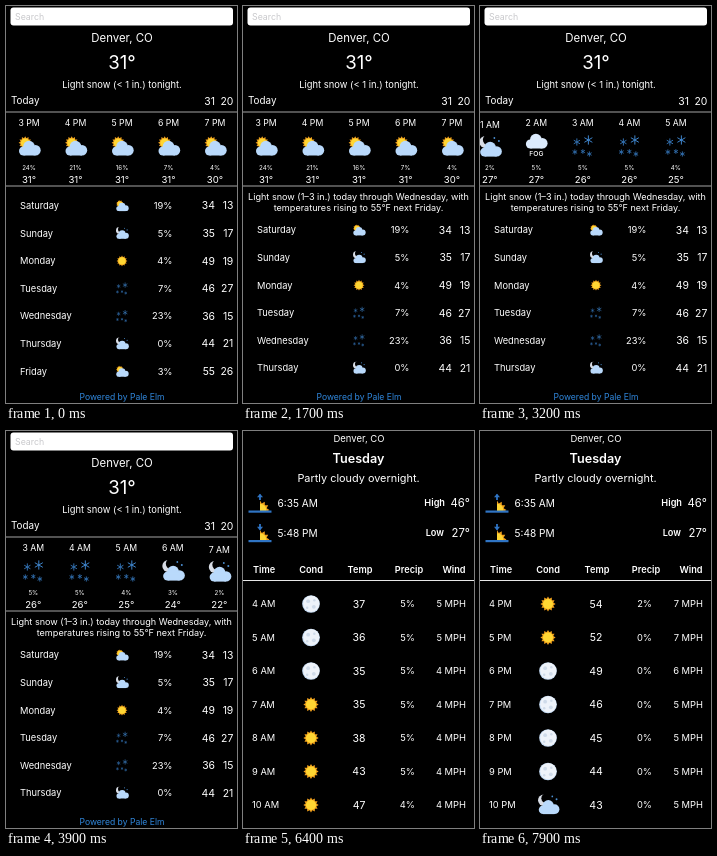
An HTML page with a canvas for the animation above (8 s loop, 231 px wide and 397 px high).

```html
<!DOCTYPE html>
<html lang="en">
<head>
<meta charset="utf-8">
<title>Weather</title>
<style>
html, body { margin: 0; width: 100%; height: 100%; overflow: hidden; background: #000; }
canvas { display: block; width: 231px; height: 397px; }
</style>
</head>
<body>
<canvas id="stage"></canvas>
<script>
const W = 231, H = 397, LOOP = 8000;
const canvas = document.getElementById('stage');
const c = canvas.getContext('2d');
const dpr = window.devicePixelRatio || 1;
canvas.width = W * dpr;
canvas.height = H * dpr;

// Smooth curve through [time, value] points, at rest at both ends.
function track(t, pts) {
  const n = pts.length - 1;
  if (t <= pts[0][0]) return pts[0][1];
  if (t >= pts[n][0]) return pts[n][1];
  const slope = i => {
    if (i === 0 || i === n) return 0;
    const a = (pts[i][1] - pts[i - 1][1]) / (pts[i][0] - pts[i - 1][0]);
    const b = (pts[i + 1][1] - pts[i][1]) / (pts[i + 1][0] - pts[i][0]);
    return a * b <= 0 ? 0 : 2 * a * b / (a + b);
  };
  const i = pts.findIndex(p => p[0] > t) - 1;
  const [t0, v0] = pts[i], [t1, v1] = pts[i + 1];
  const d = t1 - t0, u = (t - t0) / d, w = 1 - u;
  return v0 * w * w * (1 + 2 * u) + v1 * u * u * (3 - 2 * u) +
    slope(i) * d * u * w * w - slope(i + 1) * d * u * u * w;
}

// y is the middle of the capitals.
function text(s, x, y, size, align = 'left', color = '#fff', weight = 400) {
  c.font = `${weight} ${size}px Inter, Roboto, sans-serif`;
  c.textAlign = align;
  c.fillStyle = color;
  c.fillText(s, x, y + size * 0.36);
}

function disc(x, y, r, color) {
  c.fillStyle = color;
  c.beginPath();
  c.arc(x, y, r, 0, Math.PI * 2);
  c.fill();
}

function rule(y, color = '#a4a4a4') {
  c.fillStyle = color;
  c.fillRect(0, y, W, 1);
}

function clipped(y0, y1, draw) {
  c.save();
  c.beginPath();
  c.rect(0, y0, W, y1 - y0);
  c.clip();
  draw();
  c.restore();
}

function sunAt(x, y, r) {
  c.fillStyle = '#f0a01c';
  c.beginPath();
  for (let i = 0; i < 24; i++) {
    const a = i * Math.PI / 12, q = i % 2 ? r * 0.72 : r;
    c.lineTo(x + q * Math.cos(a), y + q * Math.sin(a));
  }
  c.fill();
  disc(x, y, r * 0.66, '#ffd633');
}

function cloud(x, y, color = '#b9d9fb') {
  disc(x - 6, y + 2.5, 4.5, color);
  disc(x - 0.5, y - 2, 5.8, color);
  disc(x + 6, y + 1.8, 5.2, color);
  c.fillRect(x - 6, y, 12, 7);
}

function flake(x, y, r) {
  c.strokeStyle = r > 4 ? '#3f85cc' : '#326fae';
  c.lineWidth = r > 3 ? 1 : 0.9;
  c.beginPath();
  for (let i = 0; i < 3; i++) {
    const a = i * Math.PI / 3 + Math.PI / 6;
    const dx = r * Math.cos(a), dy = r * Math.sin(a);
    c.moveTo(x - dx, y - dy);
    c.lineTo(x + dx, y + dy);
  }
  c.stroke();
}

// Half a sun on the horizon; the arrow points up (dir -1) or down (dir 1).
function sunEdge(dir) {
  clipped(-5, 6, () => sunAt(0, 5, 9.5));
  c.fillStyle = '#2f74c4';
  c.fillRect(-11.5, 5.5, 23, 2.2);
  c.fillRect(-0.9, -10.5, 1.8, 5.5);
  c.beginPath();
  c.moveTo(-3, -7.7);
  c.lineTo(3, -7.7);
  c.lineTo(0, -7.7 + dir * 3.6);
  c.fill();
}

const icons = {
  day() { sunAt(-3.8, -3.2, 6.6); cloud(0.5, 2.5); },
  night() {
    disc(-4.5, -5, 6, '#d8dde6');
    disc(-1.8, -7.2, 5.2, '#000');
    disc(4.5, -9, 0.9, '#4b8fd2');
    disc(9, -6, 1, '#4b8fd2');
    cloud(0.8, 2.6);
  },
  fog() { cloud(0, -4.5, '#dcebfd'); text('FOG', 0, 8, 6.7, 'center', '#fff', 500); },
  snow() {
    flake(5.5, -6, 4.6);
    flake(-6, -4, 3.6);
    flake(-8, 6, 2.6);
    flake(0, 5.5, 2.3);
    flake(6.5, 8, 2.6);
  },
  sun() { sunAt(0, 0, 9.5); },
  moon() {
    disc(0, 0, 9.3, '#c6dcf4');
    disc(0.3, -0.2, 8.5, '#eef3fa');
    for (const [x, y, r] of [[-3, -3, 2], [3.5, -4, 1.3], [3, 3, 2], [-4, 4, 1.3]])
      disc(x, y, r, '#cfdbea');
  },
  rise() { sunEdge(-1); },
  set() { sunEdge(1); }
};

function icon(name, x, y, scale = 1) {
  c.save();
  c.translate(x, y);
  c.scale(scale, scale);
  icons[name]();
  c.restore();
}

const hourName = h => `${h % 12 || 12} ${h % 24 < 12 ? 'AM' : 'PM'}`;

// icon, chance of rain, temperature; from 3 PM on
const hours = [
  ['day', 24, 31], ['day', 21, 31], ['day', 16, 31], ['day', 7, 31], ['day', 4, 30],
  ['night', 3, 29], ['night', 3, 28], ['night', 2, 27], ['night', 2, 27], ['night', 2, 27],
  ['night', 2, 27], ['fog', 5, 27], ['snow', 5, 26], ['snow', 5, 26], ['snow', 4, 25],
  ['night', 3, 24], ['night', 2, 22]
];
const days = [
  ['Saturday', 'day', 19, 34, 13], ['Sunday', 'night', 5, 35, 17], ['Monday', 'sun', 4, 49, 19],
  ['Tuesday', 'snow', 7, 46, 27], ['Wednesday', 'snow', 23, 36, 15],
  ['Thursday', 'night', 0, 44, 21], ['Friday', 'day', 3, 55, 26]
];
const temps = [39, 39, 38, 37, 37, 36, 35, 35, 38, 43, 47, 50, 52, 54, 55, 55, 54, 52, 49, 46, 45, 44, 43, 42];
const rain = h => h < 10 ? 5 : h < 12 ? 4 : h < 14 ? 3 : h < 17 ? 2 : 0;
const wind = h => h < 6 ? 5 : h < 11 ? 4 : h < 13 ? 5 : h < 15 ? 6 : h < 18 ? 7 : h < 19 ? 6 : 5;
const sky = h => h < 7 ? 'moon' : h < 18 ? 'sun' : h < 22 ? 'moon' : 'night';

function drawHours(shift) {
  hours.forEach(([name, chance, temp], i) => {
    const x = 23 + i * 46.5 - shift;
    if (x < -30 || x > W + 30) return;
    const low = (i > 4 && i < 11) || i === 16 ? 2 : 0;
    text(hourName(15 + i), x, 117 + low, 8.7, 'center');
    icon(name, x, 140 + low / 2);
    text(chance + '%', x, 161.3, 6.2, 'center');
    text(temp + '°', x, 173.6, 9.6, 'center');
  });
}

function drawDays(top) {
  text('Light snow (1–3 in.) today through Wednesday, with', W / 2, top - 33.5, 9.1, 'center');
  text('temperatures rising to 55°F next Friday.', W / 2, top - 22, 9.1, 'center');
  days.forEach(([day, name, chance, high, low], i) => {
    const y = top + i * 27.6;
    text(day, 14, y, 9.3);
    icon(name, 116, y, 0.57);
    text(chance + '%', 166.5, y, 9.3, 'right');
    text(high, 209, y, 10.4, 'right');
    text(low, 227.3, y, 10.4, 'right');
  });
}

function drawForecast(t) {
  c.fillStyle = '#fff';
  c.beginPath();
  c.roundRect(4.5, 1.5, 222.5, 18, 3);
  c.fill();
  text('Search', 9, 11, 8.8, 'left', '#c9c9cc');
  text('Denver, CO', 116, 32.3, 11.4, 'center');
  text('31°', 116, 56, 18.6, 'center');
  text('Light snow (< 1 in.) tonight.', 116, 79, 9.4, 'center');
  text('Today', 5, 94.8, 9.9);
  text('31', 209, 94.8, 10.4, 'right');
  text('20', 227.3, 94.8, 10.4, 'right');

  const shift = track(t, [[1700, 0], [2400, 243], [3200, 478], [4300, 569]]);
  const top = track(t, [[50, 199.7], [350, 192], [800, 199.7], [930, 199.7], [1100, 210], [1500, 224]]);
  clipped(107, 179, () => drawHours(shift));
  clipped(183, 379, () => drawDays(top));
  rule(105.5);
  rule(179.5);
  text('Powered by Pale Elm', 116, 391, 8.6, 'center', '#3087dc');
}

function drawDetail(t) {
  text('Denver, CO', 116, 7.3, 9.5, 'center');
  text('Tuesday', 115.5, 27, 12.6, 'center', '#fff', 600);
  text('Partly cloudy overnight.', 115.5, 47.3, 10.9, 'center');
  icon('rise', 17, 74);
  icon('set', 17, 103.5);
  text('6:35 AM', 34.5, 72, 10.1);
  text('5:48 PM', 34.5, 102, 10.1);
  text('High', 202, 72, 9.2, 'right', '#fff', 600);
  text('46°', 227, 72, 11.3, 'right');
  text('Low', 201, 102, 9.2, 'right', '#fff', 600);
  text('27°', 227, 102, 11.3, 'right');
  [['Time', 21], ['Cond', 68], ['Temp', 117], ['Precip', 166], ['Wind', 211]]
    .forEach(([s, x]) => text(s, x, 139, 9.2, 'center', '#fff', 600));
  rule(149, '#e8e8e8');

  // The table scrolls by whole rows.
  const pos = t < 6400 ? (t - 6000) / 100 : 4 + (t - 6400) / 125;
  const first = Math.round(Math.min(16, Math.max(0, pos)));
  for (let i = 0; i < 7; i++) {
    const h = first + i, y = 173 + i * 33.5;
    text(hourName(h), 9, y, 9.3);
    const name = sky(h);
    icon(name, 68, y, name === 'sun' ? 0.8 : 0.95);
    text(temps[h], 116, y, 10.5, 'center');
    text(rain(h) + '%', 172, y, 9.3, 'right');
    text(wind(h) + ' MPH', 223, y, 9.4, 'right');
  }
}

function page(x, draw, t) {
  c.save();
  c.translate(x, 0);
  c.fillStyle = '#000';
  c.fillRect(0, 0, W, H);
  draw(t);
  c.restore();
}

function frame(now) {
  const t = now % LOOP;
  c.setTransform(dpr, 0, 0, dpr, 0, 0);
  const push = track(t, [[5200, 0], [5350, 0.55], [5700, 1]]);
  if (push < 1) page(-push * W * 0.3, drawForecast, t);
  if (push > 0) page((1 - push) * W, drawDetail, t);
  requestAnimationFrame(frame);
}
requestAnimationFrame(frame);
</script>
</body>
</html>
```
